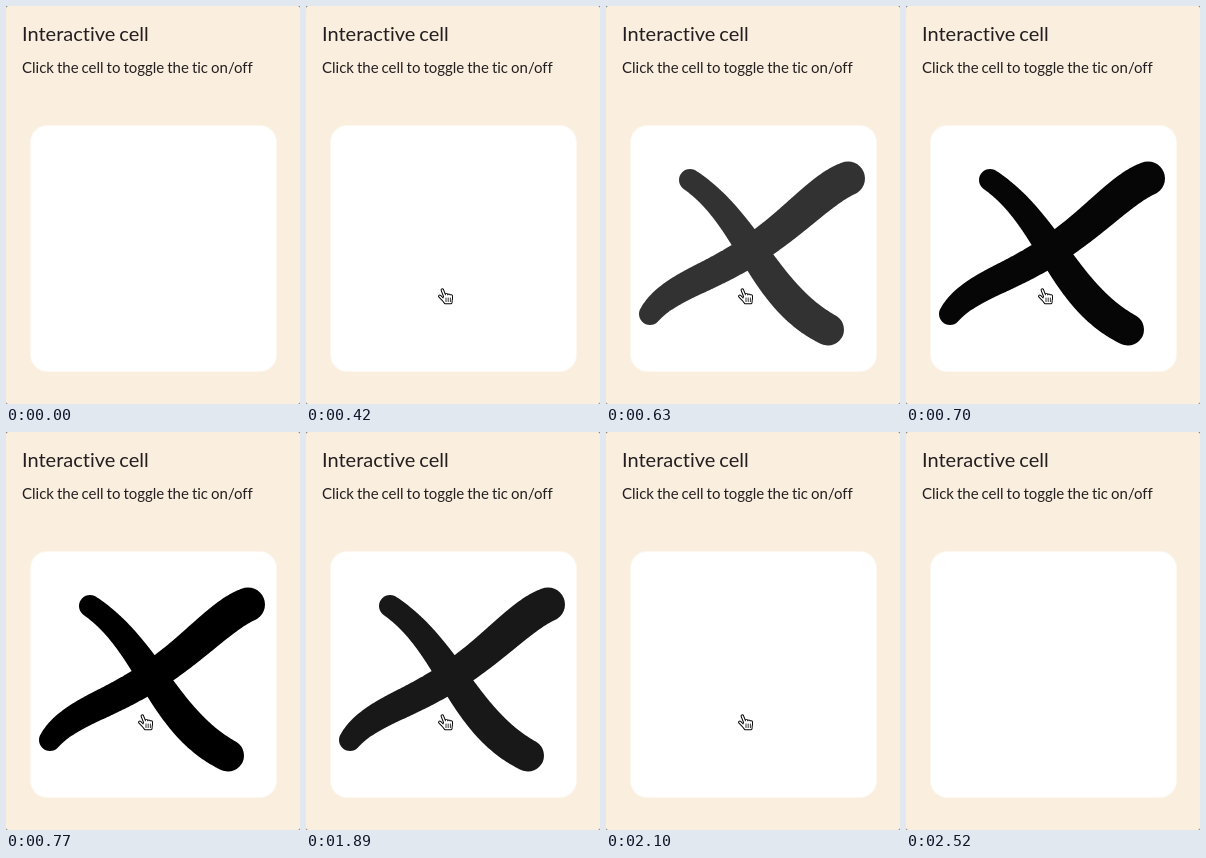
Write an HTML page with a canvas that moves like this. It is 294 by 398 pixels and loops after 2.66 s.

```html
<!DOCTYPE html>
<html lang="en">
<head>
<meta charset="utf-8">
<title>Interactive cell</title>
<style>
  html, body { margin: 0; width: 100%; height: 100%; overflow: hidden; background: #faeede; }
  canvas, svg { position: absolute; left: 0; top: 0; width: 294px; height: 398px; }
  text {
    font-family: Lato, sans-serif;
    font-variant-ligatures: none;
    word-spacing: -0.057em;
    fill: #231f20;
  }
</style>
</head>
<body>
<canvas id="stage"></canvas>
<svg viewBox="0 0 294 398">
  <text x="16" y="35" font-size="20">Interactive cell</text>
  <text x="16" y="66.5" font-size="15">Click the cell to toggle the tic on/off</text>
</svg>
<script>
const W = 294, H = 398;
const LOOP = 2660, STEP = 70, FADE = 230;
const FADE_IN = 515, FADE_OUT = 1867;
const CURSOR_ON = 420, CURSOR_OFF = 2520;

const canvas = document.getElementById('stage');
const ctx = canvas.getContext('2d');
const dpr = window.devicePixelRatio || 1;
canvas.width = W * dpr;
canvas.height = H * dpr;
ctx.scale(dpr, dpr);

const mix = (a, b, t) => a + (b - a) * t;

// Bezier curve of any degree, in any number of dimensions
function bezier(points, t) {
  if (points.length === 1) return points[0];
  const next = points.slice(1).map((p, i) => p.map((v, n) => mix(points[i][n], v, t)));
  return bezier(next, t);
}

// A round brush follows a curve whose control points are x, y, radius
function addBrush(path, ...controls) {
  const dots = 250;
  for (let i = 0; i <= dots; i++) {
    const [x, y, r] = bezier(controls, i / dots);
    path.moveTo(x + r, y);
    path.arc(x, y, r, 0, Math.PI * 2);
  }
}

const tic = new Path2D();
addBrush(tic, [84, 174, 11], [143, 214, 12.5], [157, 290, 18.5], [222, 323.5, 16]);
addBrush(tic, [44, 308, 11], [77, 262, 17], [150, 275, 12], [194, 192, 19], [242, 172.5, 17]);

// Index finger, thumb and palm, then three knuckles
const hand = new Path2D('M4.8 3L8 11M2.3 9.3L6 13M7.5 9H13.8L13.3 15.6H8L6 13Z');
const creases = new Path2D();
for (let i = 0; i < 3; i++) {
  hand.moveTo(9 + 2.4 * i, 7.6 + 0.7 * i);
  hand.lineTo(9 + 2.4 * i, 12);
  creases.moveTo(8.5 + 2.2 * i, 11);
  creases.lineTo(8.5 + 2.2 * i, 14.6);
}

// CSS "ease" curve
function ease(x) {
  if (x <= 0) return 0;
  if (x >= 1) return 1;
  const curve = [[0, 0], [0.25, 0.1], [0.25, 1], [1, 1]];
  let lo = 0, hi = 1;
  for (let i = 0; i < 24; i++) {
    const mid = (lo + hi) / 2;
    if (bezier(curve, mid)[0] < x) lo = mid; else hi = mid;
  }
  return bezier(curve, lo)[1];
}

function roundRect(x, y, w, h, r, color) {
  ctx.fillStyle = color;
  ctx.beginPath();
  ctx.roundRect(x, y, w, h, r);
  ctx.fill();
}

function strokePath(path, color, width) {
  ctx.strokeStyle = color;
  ctx.lineWidth = width;
  ctx.stroke(path);
}

function drawCursor() {
  ctx.save();
  ctx.translate(131.5, 281);
  ctx.lineJoin = ctx.lineCap = 'round';
  strokePath(hand, '#000', 3.4);
  strokePath(hand, '#fff', 1.5);
  ctx.fillStyle = '#fff';
  ctx.fill(hand);
  strokePath(creases, '#000', 0.8);
  ctx.restore();
}

function draw(t) {
  ctx.fillStyle = '#777';
  ctx.fillRect(0, 0, W, H);
  roundRect(0, 0, W, H, 2.5, '#faeede');
  roundRect(24, 119, 247, 247, 17, '#fdf7f0');
  roundRect(25, 120, 245, 245, 16, '#fff');

  const alpha = ease((t - FADE_IN) / FADE) - ease((t - FADE_OUT) / FADE);
  if (alpha > 0) {
    ctx.globalAlpha = alpha;
    ctx.fillStyle = '#000';
    ctx.fill(tic);
    ctx.globalAlpha = 1;
  }
  if (t >= CURSOR_ON && t < CURSOR_OFF) drawCursor();
}

const start = performance.now();
function tick() {
  const t = (performance.now() - start) % LOOP;
  draw(Math.floor(t / STEP) * STEP);
  requestAnimationFrame(tick);
}
tick();
</script>
</body>
</html>
```
